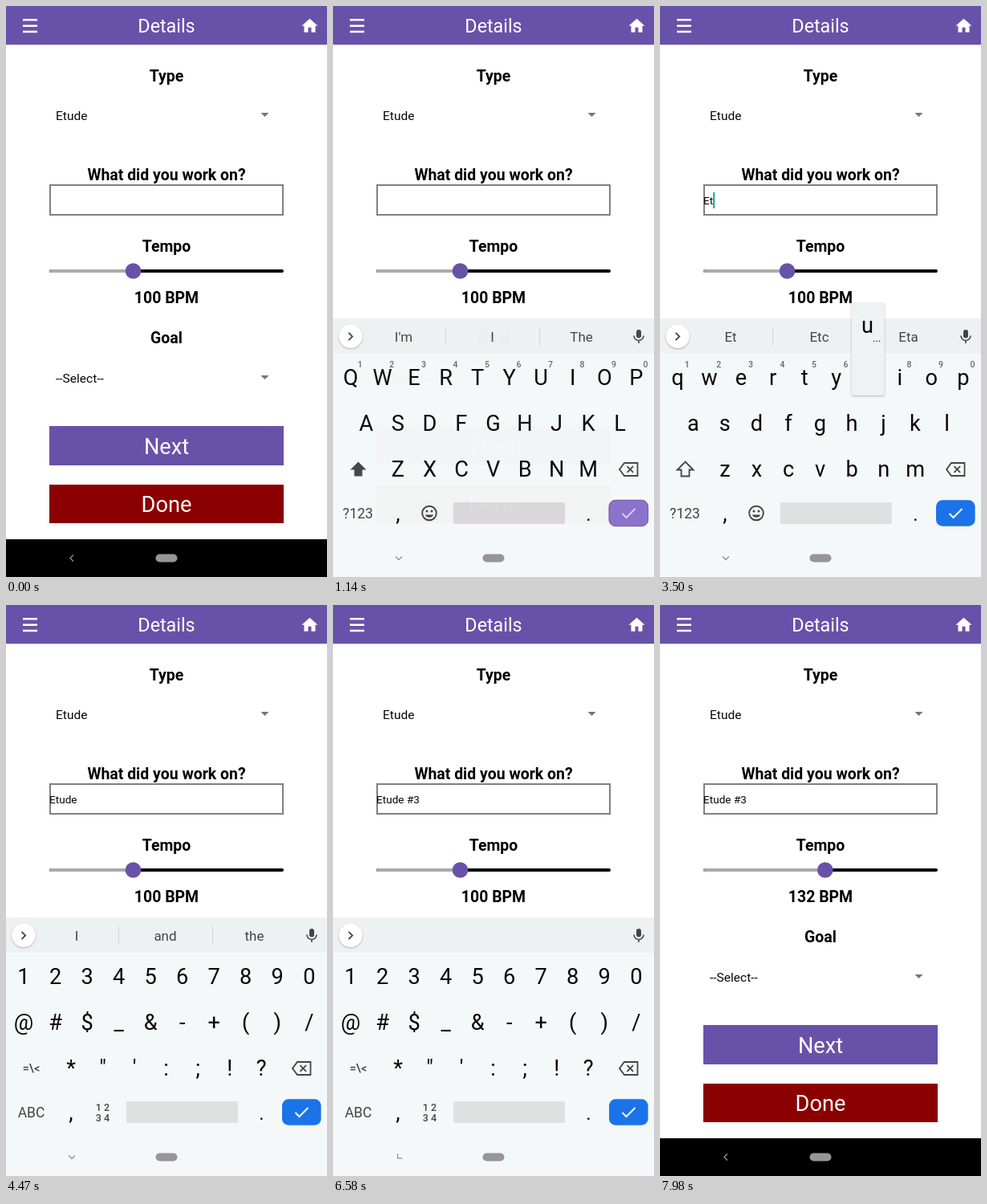
Recreate the animation shown at these times as an HTML page. Size 400x711 px, loop 8000 ms.

```html
<!DOCTYPE html>
<html lang="en">
<head>
<meta charset="utf-8">
<title>Practice details form</title>
<style>
  html, body { margin: 0; width: 100%; height: 100%; overflow: hidden; background: #fff; }
  svg { display: block; width: 100vw; height: 100vh; font-family: Roboto, sans-serif; }
</style>
</head>
<body>
<svg id="stage" viewBox="0 0 400 711"></svg>
<script>
const LOOP = 8000;
const PURPLE = '#6852a9', INK = '#060606', DARK = '#424446';
const stage = document.getElementById('stage');
const pen = document.createElement('canvas').getContext('2d');

// Each track holds [start time, value] steps.
const typed = [[0, ''], [2710, 'E'], [3215, 'Et'], [3600, 'Etu'], [3700, 'Etud'], [3880, 'Etude'],
  [3980, 'Etude '], [4990, 'Etude #'], [5440, 'Etude #3']];
const pressed = [[0, ''], [2570, 'E'], [2710, ''], [3120, 't'], [3215, ''], [3500, 'u'], [3600, 'd'],
  [3700, ''], [3780, 'e'], [3880, ''], [4910, '#'], [4990, ''], [5330, '3'], [5440, '']];
const layout = [[0, 'upper'], [2810, 'lower'], [4470, 'symbols']];
const hints = [[0, "I'm|I|The"], [2710, 'E|Even|Every'], [3310, 'Et|Etc|Eta'], [3600, 'Etude|Etui|Etudes'],
  [3980, 'I|and|the'], [4990, '']];
const caret = [[0, 0], [1760, 1], [4470, 0], [4990, 1], [5950, 0], [6440, 1], [6580, 0]];
const keyboardFade = [[0, 0], [980, .3], [1060, .75], [1140, .98], [1220, 1], [6660, .5], [6740, 0]];
const keyboardDrop = [[0, 0], [980, 60], [1060, 18], [1140, 0], [6660, 45], [6740, 0]];
const navFill = [[0, '#000'], [1140, '#f7f9f9'], [6660, '#000']];
const navTurn = [[0, 0], [980, -45], [1060, -90], [6580, -45], [6660, 0]];
const tempo = [[0, 100], [7550, 102], [7636, 109], [7722, 117], [7808, 124], [7894, 130], [7980, 132]];

const letterRows = ['QWERTYUIOP', 'ASDFGHJKL', 'ZXCVBNM'];
const symbolRows = ['1234567890', '@#$_&-+()/', '*"\':;!?'];
const rowY = [463, 520, 577];
const PITCH = 39.53;
const CENTERED = 'text-anchor="middle"', MEDIUM = CENTERED + ' font-weight="500"';

const at = (track, t) => track.reduce((value, step) => step[0] <= t ? step[1] : value, null);
const escapeText = s => s.replace(/&/g, '&amp;').replace(/</g, '&lt;');
const text = (s, x, y, size, fill = INK, extra = CENTERED) =>
  `<text x="${x}" y="${y}" font-size="${size}" fill="${fill}" ${extra}>${escapeText(s)}</text>`;
const rect = (x, y, w, h, fill, extra = '') =>
  `<rect x="${x}" y="${y}" width="${w}" height="${h}" fill="${fill}" ${extra}/>`;
const circle = (x, y, r, fill, extra = '') => `<circle cx="${x}" cy="${y}" r="${r}" fill="${fill}" ${extra}/>`;
const line = (d, color, width, extra = '') =>
  `<path d="${d}" fill="none" stroke="${color}" stroke-width="${width}" ${extra}/>`;
const shape = (d, fill, extra = '') => `<path d="${d}" fill="${fill}" ${extra}/>`;
const shadow = 'style="filter:drop-shadow(0 1px 1.2px #0004)"';

function form(t) {
  const bpm = at(tempo, t), thumbX = 158.5 + (bpm - 100) * 1.478;
  const entry = at(typed, t);
  const heading = (s, y) => text(s, 200, y, 19.45, '#000', CENTERED + ' font-weight="700"');
  const picker = (s, y) => text(s, 62, y + 5.7, 15.56, INK, '') +
    shape(`M317.5 ${y - 2.7}h10l-5 5z`, '#757575');
  const button = (s, y, h, fill) => rect(54, y, 292, h, fill) + text(s, 200, y + h / 2 + 10, 27.2, '#fff');
  pen.font = '13.6px Roboto, sans-serif';
  const caretX = 54 + pen.measureText(entry).width;
  return rect(0, 0, 400, 711, '#fefffe') +
    rect(0, 0, 400, 48, PURPLE) + rect(0, 48, 400, 1, '#d8d4e6') +
    line('M21 17.3h18M21 24.7h18M21 32h18', '#fff', 2.4) +
    text('Details', 200, 33.3, 23.3, '#fff') +
    shape('M10 20v-6h4v6h5v-8h3L12 3 2 12h3v8z', '#fff', 'transform="translate(366.5 12.7)"') +
    heading('Type', 94) + picker('Etude', 135.8) +
    heading('What did you work on?', 217) +
    rect(55, 223, 290, 37, '#fefffe', 'stroke="#808080" stroke-width="2"') +
    text(entry, 54, 247, 13.6, INK, '') +
    (at(caret, t) ? rect(caretX, 232, 2, 20, '#0aa79b') : '') +
    heading('Tempo', 306) +
    rect(54, 328, 292, 4, '#000', 'rx="2"') + rect(54, 328, thumbX - 54, 4, '#aaa', 'rx="2"') +
    circle(thumbX, 330, 9.8, PURPLE) +
    heading(bpm + ' BPM', 370) +
    heading('Goal', 420) + picker('--Select--', 462.8) +
    button('Next', 523, 49, PURPLE) + button('Done', 596, 48, '#8b0000') +
    rect(0, 664, 400, 47, at(navFill, t));
}

function suggestionBar(t) {
  const words = at(hints, t);
  let out = rect(0, 389, 400, 44, '#eef1f1') +
    circle(22, 411.3, 14.7, '#fff', shadow) + line('M19.5 406.8l4.7 4.7-4.7 4.7', DARK, 1.8) +
    rect(378, 403, 6, 10.5, DARK, 'rx="3"') +
    line('M375 410.5a6 6 0 0 0 12 0M381 416v4', DARK, 1.6);
  if (words) {
    out += line('M140.5 400v23M257.5 400v23', '#d2d5d5', 1);
    words.split('|').forEach((word, i) => out += text(word, [88, 198.5, 309.5][i], 418, 17, DARK));
  }
  return out;
}

function keyboard(t) {
  const mode = at(layout, t), symbols = mode === 'symbols';
  const press = at(pressed, t), arriving = t < 1220;
  const rows = symbols ? symbolRows : letterRows;
  let out = rect(0, 389, 400, 400, '#f5f8f8') + suggestionBar(t), popup = '';

  rows.forEach((row, r) => [...row].forEach((char, i) => {
    const label = mode === 'lower' ? char.toLowerCase() : char;
    const x = (r === 2 ? 81 : row.length === 9 ? 41.3 : 22) + PITCH * i, y = rowY[r];
    out += text(label, x, y + 9.4, 27.2);
    if (!symbols && r === 0) out += text(String((i + 1) % 10), x + 11.8, 450, 10.5, '#666', MEDIUM);
    if (label === press) {
      popup = rect(x - 20.5, y - 94, 41, 116, '#eff2f2', 'rx="3" ' + shadow) +
        text(label, x - .7, y - 56, 27.2) + text('...', x + 11, y - 45, 13);
    }
  }));

  if (symbols) {
    out += text('=\\<', 31.5, 581.5, 14.5, DARK, MEDIUM) + text('ABC', 31.5, 638, 17.5, DARK) +
      text('1 2', 120.5, 630, 12.5, DARK, MEDIUM) + text('3 4', 120.5, 642.5, 12.5, DARK, MEDIUM);
  } else {
    const arrow = 'M31.5 567.5l10 10h-5v8h-10v-8h-5z';
    out += (mode === 'upper' ? shape(arrow, DARK) : line(arrow, DARK, 1.8)) +
      text('?123', 31, 638, 17.5, DARK) +
      circle(120, 631.5, 8.8, 'none', `stroke="${DARK}" stroke-width="1.9"`) +
      circle(117, 629, 1.5, DARK) + circle(123, 629, 1.5, DARK) +
      shape('M115 633.5h10a5.2 4.5 0 0 1-10 0z', DARK);
  }
  out += line('M363 569h16.5v16H363l-6-8zM366.5 573.2l7.6 7.6M374.1 573.2l-7.6 7.6', DARK, 1.8) +
    text(',', 81, 641, 27.2) + text('.', 318.3, 641, 24) +
    rect(150, 618, 139, 27, arriving ? '#dddbdf' : '#dfe1e0', 'rx="2"') +
    rect(344, 615.3, 48.6, 32.4, arriving ? '#8a70cb' : '#1a73e8', 'rx="8"' + (arriving ? ' stroke="#6752a9"' : '')) +
    line('M360.5 632l5 5 11-11', arriving ? '#d8cff0' : '#fff', 2);
  return out + popup;
}

function navigation(t) {
  return line('M84 683.5l-4 4 4 4', '#929292', 1.3, `transform="rotate(${at(navTurn, t)} 82 687.5)"`) +
    rect(186.5, 682.5, 27, 10, '#969696', 'rx="5"');
}

let shown = '';
function draw() {
  const t = performance.now() % LOOP;
  const fade = at(keyboardFade, t);
  const picture = form(t) +
    (fade ? `<g opacity="${fade}" transform="translate(0 ${at(keyboardDrop, t)})">${keyboard(t)}</g>` : '') +
    navigation(t);
  if (picture !== shown) stage.innerHTML = shown = picture;
  requestAnimationFrame(draw);
}
draw();
</script>
</body>
</html>
```
